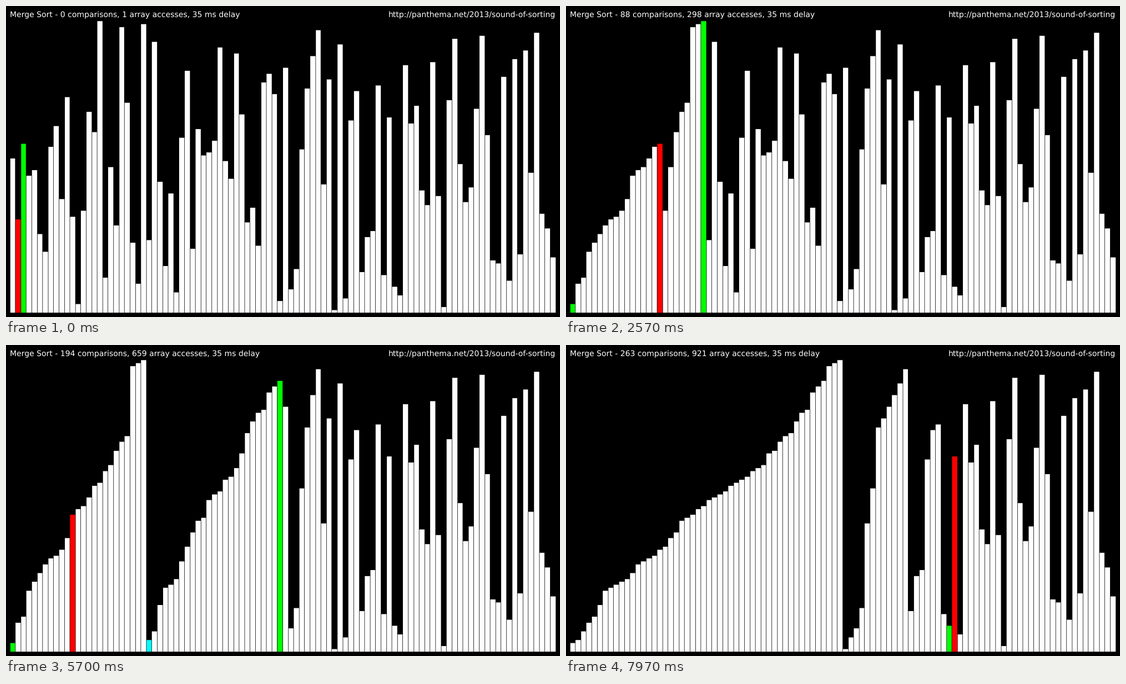
These frames come from a looping animation (998x561 px, 8 s). A matplotlib script:

```python
import numpy as np
import matplotlib.pyplot as plt
from matplotlib.animation import FuncAnimation
from matplotlib.collections import PolyCollection

W, H = 998, 561            # stage in pixels
SW, SH = 1280, 720         # drawing units
MARGIN, BASE, BAR_MAX = 10, 710, 675
FRAMES, LOOP_MS = 240, 8000
STEPS_PER_FRAME = 3.846    # array accesses between two frames
FIRST_STEP = 1.9

START = [
    53, 32, 58, 47, 49, 27, 21, 57, 64, 39, 74, 33, 3, 35, 69, 62, 100, 12, 50, 30,
    98, 72, 24, 10, 99, 25, 93, 45, 16, 41, 7, 60, 83, 22, 63, 54, 55, 59, 91, 52,
    46, 89, 68, 31, 36, 23, 79, 82, 75, 4, 84, 8, 15, 56, 77, 88, 97, 44, 80, 1,
    92, 5, 66, 76, 14, 26, 28, 78, 13, 67, 9, 6, 85, 65, 71, 42, 37, 86, 40, 2,
    73, 94, 51, 38, 43, 70, 95, 61, 18, 17, 81, 11, 87, 20, 90, 48, 96, 34, 29, 19,
]
N = len(START)

WHITE, RED, GREEN, CYAN = "#ffffff", "#ff0000", "#00ff00", "#00ffff"


class Tracer:
    """Array that records its state at every counted access."""

    def __init__(self, values):
        self.values = list(values)
        self.marks = {}
        self.comparisons = 0
        self.last = None
        self.history = []

    def record(self, i):
        self.last = i
        colors = {**self.marks, i: RED}
        self.history.append((self.values[:], colors, self.comparisons))

    def get(self, i):
        # reading the same cell again is not counted
        if i != self.last:
            self.record(i)
        return self.values[i]

    def put(self, i, value):
        self.values[i] = value
        self.record(i)

    def less(self, a, b):
        self.comparisons += 1
        return a < b


def merge(arr, lo, mid, hi):
    arr.marks[lo] = GREEN
    arr.marks[mid] = CYAN
    arr.marks[hi - 1] = GREEN
    out = []
    i, j = lo, mid
    while i < mid and j < hi:
        a, b = arr.get(i), arr.get(j)
        if arr.less(a, b):
            out.append(a)
            i += 1
        else:
            out.append(b)
            j += 1
    out += [arr.get(k) for k in range(i, mid)]
    out += [arr.get(k) for k in range(j, hi)]
    arr.marks.pop(mid, None)
    for k, value in enumerate(out):
        arr.put(lo + k, value)
    arr.marks.pop(lo, None)
    arr.marks.pop(hi - 1, None)


def merge_sort(arr, lo, hi):
    if lo + 1 < hi:
        mid = (lo + hi) // 2
        merge_sort(arr, lo, mid)
        merge_sort(arr, mid, hi)
        merge(arr, lo, mid, hi)


tracer = Tracer(START)
merge_sort(tracer, 0, N)
history = tracer.history

# whole-unit bar edges with a gap of one unit
step = (SW - 2 * MARGIN - (N - 1)) / N + 1
edges = MARGIN + np.floor(np.arange(N + 1) * step)
left, right = edges[:-1], edges[1:] - 1


def bar_shapes(values):
    top = BASE - np.floor(np.array(values) * BAR_MAX / N)
    base = np.full(N, BASE)
    xs = np.stack([left, left, right, right], axis=1)
    ys = np.stack([base, top, top, base], axis=1)
    return np.stack([xs, ys], axis=2)


plt.rcParams["font.family"] = "DejaVu Sans"
plt.rcParams["text.hinting"] = "none"

fig = plt.figure(figsize=(W / 100, H / 100), dpi=100, facecolor="black")
ax = fig.add_axes([0, 0, 1, 1])
ax.set_xlim(0, SW)
ax.set_ylim(SH, 0)
ax.axis("off")

bars = PolyCollection(bar_shapes(START), facecolors=WHITE, edgecolors="none",
                      linewidths=0, antialiaseds=True)
bars.set_snap(False)
ax.add_collection(bars, autolim=False)

font = dict(color="white", fontsize=14 * 72 / 100, va="baseline")
text_y = (H - 20) / H
status = fig.text(7 / W, text_y, "", ha="left", **font)
fig.text(990.2 / W, text_y, "http://panthema.net/2013/sound-of-sorting",
         ha="right", **font)


def update(frame):
    accesses = int(FIRST_STEP + STEPS_PER_FRAME * frame)
    values, colors, comparisons = history[accesses - 1]
    bars.set_verts(bar_shapes(values))
    bars.set_facecolor([colors.get(i, WHITE) for i in range(N)])
    status.set_text(f"Merge Sort - {comparisons} comparisons, "
                    f"{accesses} array accesses, 35 ms delay")
    return bars, status


anim = FuncAnimation(fig, update, frames=FRAMES, interval=LOOP_MS / FRAMES,
                     repeat=True, repeat_delay=0)
plt.show()
```
